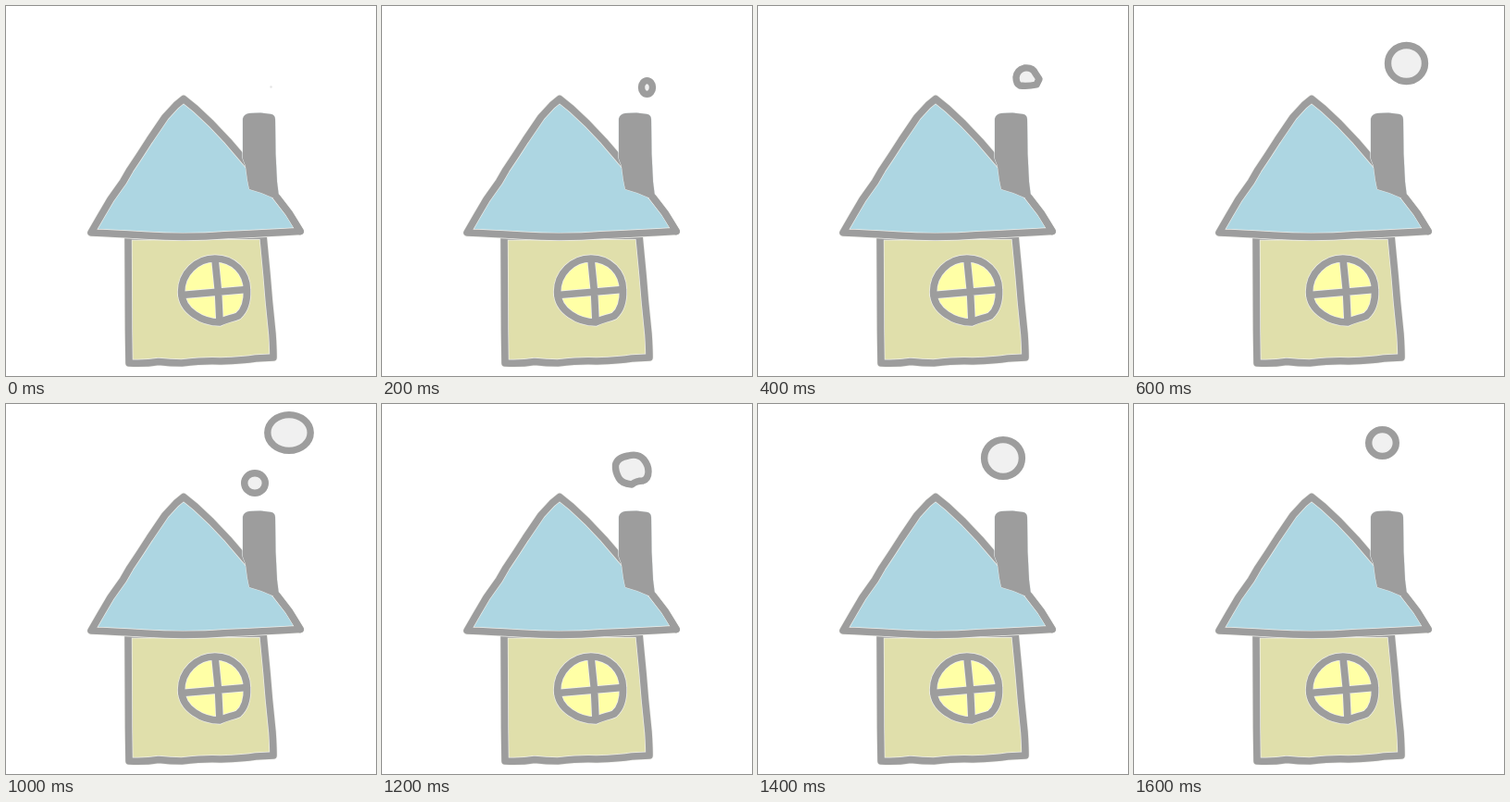
Recreate the animation shown at these times as an HTML page. Size 400 by 400 pixels, loop 1.8 s.

```html
<!DOCTYPE html>
<html>
<head>
<meta charset="utf-8">
<title>House with a smoking chimney</title>
<style>
  html, body { margin: 0; width: 100%; height: 100%; overflow: hidden; background: #fff; }
  svg { display: block; width: 100vw; height: 100vh; }
  path { stroke-linejoin: round; stroke-linecap: round; }
  .edge { fill: none; stroke: #f0f0ec; stroke-width: 9; }
  .line { fill: none; stroke: #9d9d9d; stroke-width: 7.6; }
</style>
</head>
<body>
<svg viewBox="0 0 400 400">
  <defs>
    <path id="wall" d="M132 249L132.500 350L133 386Q150 387 165 384.500Q178 386 190 386Q215 383 232 384Q258 383 270 381L289 380Q289 370 288 355L284.500 320L282 290L278 248Z"/>
    <path id="window" d="M189.600 309C189.600 289 206 273 226 273S260.500 288 260.500 307C261 321 258 329 251 335C244 338 238 338 231 342C213 342 189.600 330 189.600 309Z"/>
    <path id="cross" d="M226 274L229.500 309L231 341M190 312.500L225 309.500L260 306.500"/>
    <path id="roof" d="M192 100.500L184 107L172 120L155 145L144 162L134 177L126.500 190L113 209L103 226L92 245Q115 246 150 248Q195 251 240 247.500Q275 246 318 243.500L306 224L292 206L275 187L258 167L240 146L222 127L205 111Z"/>
    <path id="chimney" d="M256 122Q257 117 263 116L275 115.500L287 117Q291 118 291 123L291.500 160L293 190L295 206L288 207L276 202L263 198L261 188L259 173L256 165Z"/>
  </defs>
  <g fill="#e0dfab"><use href="#wall"/></g>
  <use href="#wall" class="edge"/><use href="#wall" class="line"/>
  <g fill="#ffffa6"><use href="#window"/></g>
  <g class="edge"><use href="#window"/><use href="#cross"/></g>
  <g class="line"><use href="#window"/><use href="#cross"/></g>
  <g fill="#add6e2"><use href="#roof"/></g>
  <use href="#roof" class="edge"/><use href="#roof" class="line"/>
  <g fill="#9d9d9d" stroke="#e6eced" stroke-width="1"><use href="#chimney"/></g>
  <g fill="#9d9d9d"><use href="#chimney"/></g>
  <path class="line" d="M293 207L306 224L318 243.500"/>
  <g id="smoke"></g>
</svg>
<script>
const STEP = 200;
const smoke = document.getElementById('smoke');

const puff = d => `<path d="${d}" fill="#f0f0f0" stroke="#9d9d9d" stroke-width="7.4"/>`;
const oval = (x, y, rx, ry) =>
  puff(`M${x - rx} ${y}a${rx} ${ry} 0 1 1 ${2 * rx} 0a${rx} ${ry} 0 1 1 ${-2 * rx} 0Z`);

const poses = [
  '<circle cx="286.5" cy="87.5" r="1.2" fill="#e4e4e4"/>',
  oval(286.5, 88, 6, 7.4),
  puff('M279 77Q280 69 288 67Q297 66 300 73L304 79L301 85Q292 87 283 86Q279 84 279 77Z'),
  oval(294.5, 62, 20, 19.5),
  oval(297.5, 41, 22.8, 23.2) + oval(270.5, 92, 5.2, 5.8),
  oval(306, 31, 23.2, 19.4) + oval(269, 85.5, 11.3, 10.8),
  puff('M252.5 66Q254 58 266 56Q277 53 283 60Q288 66 288 73Q288 81 282 83Q275 83 270 87Q259 86 256 80Q252 73 252.5 66Z'),
  oval(265, 58.5, 20.4, 19.9),
  oval(268.5, 42, 14.8, 14.4)
];

let shown = -1;
function draw() {
  const pose = Math.floor(performance.now() / STEP) % poses.length;
  if (pose !== shown) smoke.innerHTML = poses[shown = pose];
  requestAnimationFrame(draw);
}
draw();
</script>
</body>
</html>
```
